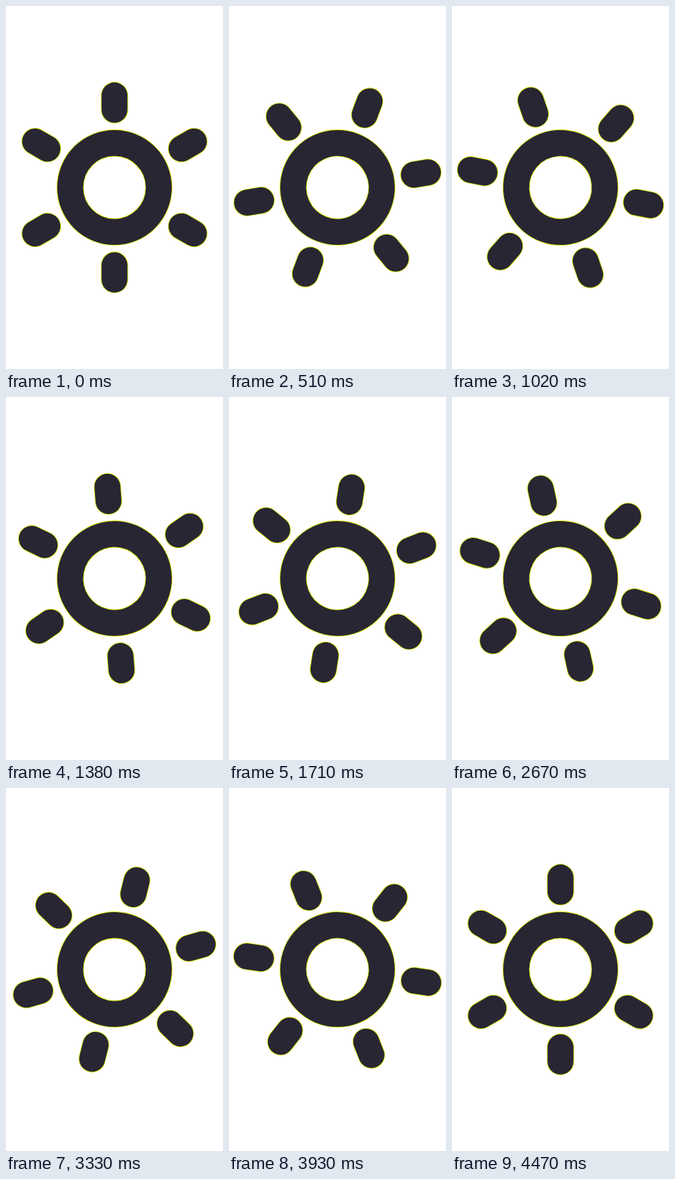
Write an HTML page with a canvas that moves like this. It is 300 by 500 pixels and loops after 4.5 s.

```html
<!DOCTYPE html>
<html lang="en">
<head>
<meta charset="utf-8">
<title>Turning sun</title>
<style>
  html, body { margin: 0; width: 100%; height: 100%; overflow: hidden; background: #fff; }
  canvas { display: block; }
</style>
</head>
<body>
<canvas id="stage" width="300" height="500"></canvas>
<script>
const ctx = document.getElementById('stage').getContext('2d');
const STEP = 30, STEPS = 150;
const RING = 61.25, RAY_START = 107, RAY_END = 126.8, RAYS = 6;

const sun = new Path2D();
sun.arc(0, 0, RING, 0, Math.PI * 2);
for (let i = 0; i < RAYS; i++) {
  const a = i * Math.PI * 2 / RAYS;
  const x = Math.sin(a), y = -Math.cos(a);
  sun.moveTo(x * RAY_START, y * RAY_START);
  sun.lineTo(x * RAY_END, y * RAY_END);
}

function strokeSun(color, width) {
  ctx.strokeStyle = color;
  ctx.lineWidth = width;
  ctx.stroke(sun);
}

function draw(time) {
  const step = Math.floor(time / STEP + 0.01) % STEPS;
  ctx.setTransform(1, 0, 0, 1, 0, 0);
  ctx.fillStyle = '#fff';
  ctx.fillRect(0, 0, 300, 500);
  ctx.translate(150, 250);
  // The half turn is complete on the last step, so the loop rests for one step.
  ctx.rotate(Math.PI * step / (STEPS - 1));
  ctx.lineCap = 'round';
  strokeSun('#d9e600', 37.4);
  strokeSun('#282633', 35.7);
}

let start;
function tick(now) {
  start ??= now;
  draw(now - start);
  requestAnimationFrame(tick);
}
draw(0);
requestAnimationFrame(tick);
</script>
</body>
</html>
```
